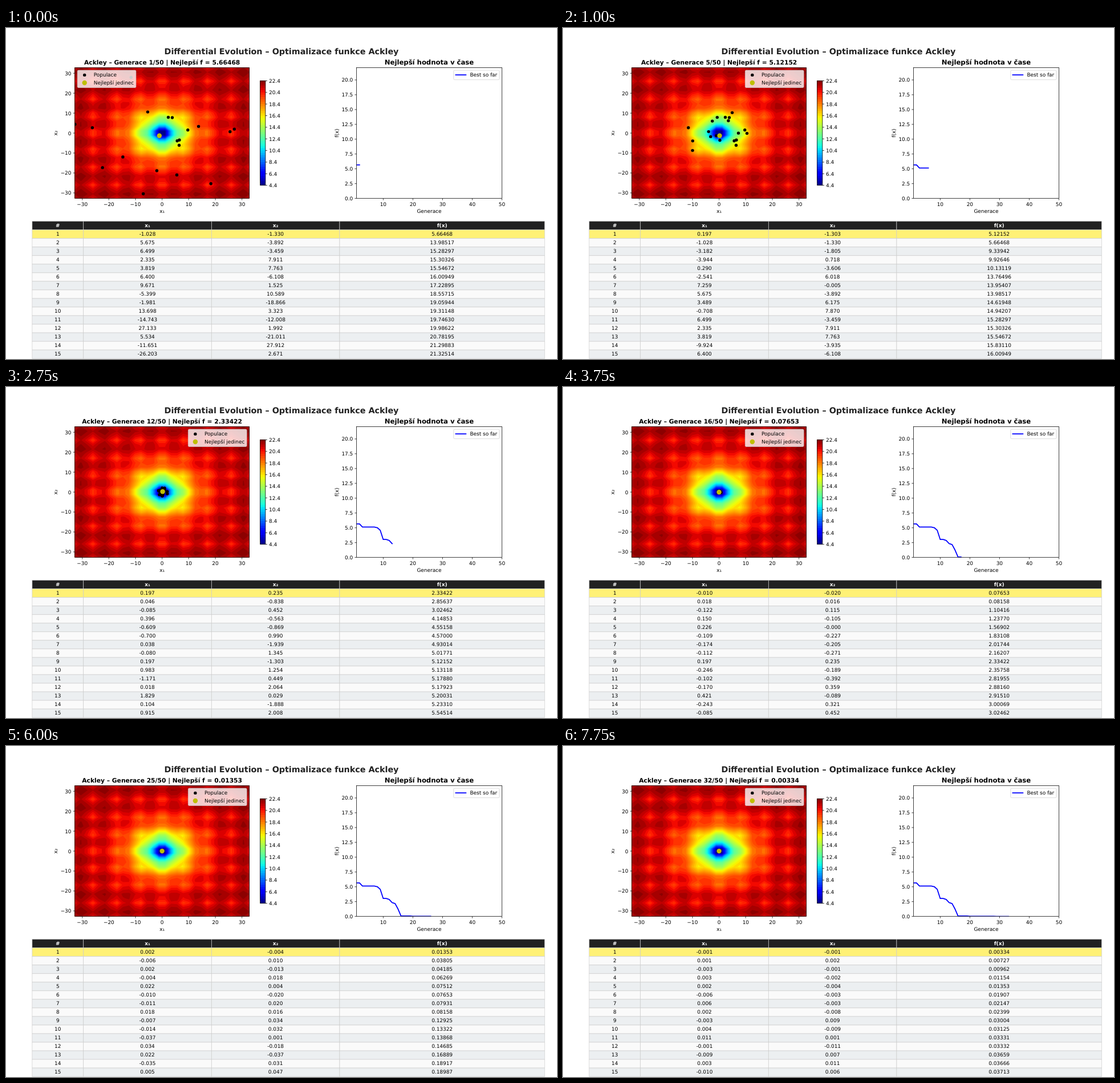
Recreate the animation shown at these times as an HTML page with a canvas. Size 966 by 580 pixels, loop 8000 ms.

```html
<!DOCTYPE html>
<html lang="cs">
<head>
<meta charset="utf-8">
<title>Differential Evolution</title>
<style>
  html, body { margin: 0; width: 966px; height: 580px; overflow: hidden; background: #fff; }
  canvas, svg { position: absolute; left: 0; top: 0; display: block; }
  text { font-family: "DejaVu Sans", sans-serif; font-size: 8.94px; text-rendering: geometricPrecision; }
  .mid { text-anchor: middle; }
  .end { text-anchor: end; }
  .bold { font-weight: bold; }
  .axis { fill: none; stroke: #000; stroke-width: .75; }
  .legend { fill: #fff; fill-opacity: .8; stroke: #ccc; stroke-opacity: .8; stroke-width: .89; }
  .curve { fill: none; stroke: #00f; stroke-width: 1.79; stroke-linecap: square; stroke-linejoin: round; }
  .best { fill: #bfbf00; }
</style>
</head>
<body>
<canvas id="map" width="966" height="580"></canvas>
<svg id="stage" width="966" height="580" viewBox="0 0 966 580"></svg>
<script>
const STEP = 250, GENS = 32, POP = 20, ROWS = 15, LIM = 32.768;
const EM = 8.94;
const left = { x: 120.75, y: 69.6, w: 305.83, h: 229.02 };
const right = { x: 614.54, y: 69.6, w: 254.86, h: 229.02 };
const bar = { x: 445.7, y: 92.5, w: 9.15, h: 183.2 };
const BOTTOM = left.y + left.h;
const px = x => left.x + left.w * (.5 + x / (2 * LIM));
const py = y => left.y + left.h * (.5 - y / (2 * LIM));
const gx = g => right.x + (g - 1) * right.w / 49;
const gy = f => BOTTOM - f * right.h / 22.06;

function ackley(x, y) {
  const c = v => Math.cos(2 * Math.PI * v);
  return 20 + Math.E - 20 * Math.exp(-.2 * Math.sqrt((x * x + y * y) / 2)) - Math.exp((c(x) + c(y)) / 2);
}

// --- population ---
// Each new best member: generation, x1, x2, f.
const bests = [
  [1, -1.028, -1.33, 5.66468], [2, .197, -1.303, 5.12152], [7, -.08, 1.345, 5.01771],
  [8, -.7, .99, 4.57], [9, -.085, .452, 3.02462], [11, .046, -.838, 2.85637],
  [12, .197, .235, 2.33422], [13, -.112, -.271, 2.16207], [14, .15, -.105, 1.2377],
  [15, -.01, -.02, .07653], [18, -.004, .018, .06269], [19, .002, -.004, .01353],
  [28, .001, .002, .00727], [30, -.001, -.001, .00334]
].map(([born, x, y, f]) => ({ born, x, y, f }));

let seed = 20;
const rand = () => (seed = (seed * 16807) % 2147483647) / 2147483647;
const spread = g => LIM * Math.exp((1 - g) / 4);
const inside = (m, g) => Math.max(Math.abs(m.x), Math.abs(m.y)) <= spread(g);

function offspring(g, floor) {
  const coord = () => { const u = 2 * rand() - 1; return spread(g) * u * Math.sqrt(Math.abs(u)); };
  let m;
  do {
    m = { x: coord(), y: coord() };
    m.f = ackley(m.x, m.y);
  } while (m.f <= floor);
  return m;
}

// The search box shrinks steadily; members left outside it are replaced.
const pops = [];
let crowd = Array(POP - 1).fill({ x: Infinity, y: Infinity });
for (let g = 1; g <= GENS; g++) {
  const elite = bests.filter(b => b.born <= g);
  const floor = elite[elite.length - 1].f;
  crowd = crowd.map(m => inside(m, g) && m.f > floor ? m : offspring(g, floor));
  pops[g] = elite.filter(b => inside(b, g)).concat(crowd).sort((a, b) => a.f - b.f).slice(0, POP);
}

// --- contour map ---
const clamp = v => Math.max(0, Math.min(1, v));
const jet = t => 'rgb(' + [
  Math.min((t - .35) / .31, 1 - (t - .89) / .22),
  Math.min((t - .125) / .25, (.91 - t) / .27),
  Math.min(.5 + t / .22, (.65 - t) / .31)
].map(v => Math.round(255 * clamp(v))).join() + ')';

function drawMap() {
  const ctx = document.getElementById('map').getContext('2d');
  const N = 30, BANDS = 45, at = i => -LIM + i * 2 * LIM / (N - 1);
  const grid = Array.from({ length: N }, (_, i) => Array.from({ length: N }, (_, j) =>
    ({ x: px(at(i)), y: py(at(j)), z: ackley(at(i), at(j)) })));
  for (let k = 0; k < BANDS; k++) {
    const level = 4.4 + .4 * k;
    ctx.fillStyle = jet((k + .5) / BANDS);
    ctx.beginPath();
    for (let i = 0; i < N - 1; i++) for (let j = 0; j < N - 1; j++) {
      const quad = [grid[i][j], grid[i + 1][j], grid[i + 1][j + 1], grid[i][j + 1]];
      const pts = [];
      quad.forEach((a, c) => {
        const b = quad[(c + 1) % 4];
        if (a.z >= level) pts.push([a.x, a.y]);
        if ((a.z >= level) !== (b.z >= level)) {
          const u = (level - a.z) / (b.z - a.z);
          pts.push([a.x + u * (b.x - a.x), a.y + u * (b.y - a.y)]);
        }
      });
      pts.forEach((p, c) => c ? ctx.lineTo(...p) : ctx.moveTo(...p));
      if (pts.length) ctx.closePath();
    }
    ctx.fill();
    ctx.fillRect(bar.x, bar.y, bar.w, bar.h * (1 - k / BANDS));
  }
}

// --- static chart parts ---
const stage = document.getElementById('stage');
function add(tag, attrs, parent = stage) {
  const el = document.createElementNS('http://www.w3.org/2000/svg', tag);
  for (const k in attrs) el.setAttribute(k, attrs[k]);
  parent.appendChild(el);
  return el;
}
function label(x, y, str, cls = 'mid', attrs = {}, parent = stage) {
  const el = add('text', { x, y, class: cls, ...attrs }, parent);
  el.textContent = str;
  return el;
}
const num = v => String(v).replace('-', '−');
const line = d => add('path', { d, class: 'axis' });
function xTick(x, v) {
  line(`M${x} ${BOTTOM}v3.13`);
  label(x, BOTTOM + 13.1, num(v));
}
function yTick(x, y, str) {
  line(`M${x} ${y}h-3.13`);
  label(x - 6.26, y + 3.4, str, 'end');
}
const rect = (b, attrs, parent) => add('rect', { x: b.x, y: b.y, width: b.w, height: b.h, ...attrs }, parent);
function clip(id, box) {
  rect(box, {}, add('clipPath', { id }));
  return add('g', { 'clip-path': `url(#${id})` });
}
const midX = b => b.x + b.w / 2;
const sideLabel = (x, str) =>
  label(0, 0, str, 'mid', { transform: `translate(${x} ${left.y + left.h / 2}) rotate(-90)` });

drawMap();
label(483, 45.7, 'Differential Evolution – Optimalizace funkce Ackley', 'mid bold',
  { style: 'font-size:14.31px', fill: '#222' });
const title = label(midX(left), 64.2, '', 'mid bold', { style: 'font-size:10.73px' });
label(midX(right), 64.2, 'Nejlepší hodnota v čase', 'mid bold', { style: 'font-size:11.63px' });

const dots = clip('left', left);
const curve = add('path', { class: 'curve' }, clip('right', right));
[left, right, bar].forEach(b => rect(b, { class: 'axis' }));

for (let v = -30; v <= 30; v += 10) {
  xTick(px(v), v);
  yTick(left.x, py(v), num(v));
}
for (let v = 10; v <= 50; v += 10) xTick(gx(v), v);
for (let v = 0; v <= 20; v += 2.5) yTick(right.x, gy(v), v.toFixed(1));
for (let i = 0; i < 10; i++) {
  const y = bar.y + bar.h * (1 - i / 9);
  line(`M${bar.x + bar.w} ${y}h3.13`);
  label(bar.x + bar.w + 6.26, y + 3.4, (4.4 + 2 * i).toFixed(1), '');
}
label(midX(left), 324.1, 'x₁');
label(midX(right), 324.1, 'Generace');
sideLabel(89.8, 'x₂');
sideLabel(582.9, 'f(x)');

const legend = add('g', {});
rect({ x: 125.2, y: 74.07, w: 102.7, h: 30.4 }, { rx: 1.8, class: 'legend' }, legend);
add('circle', { cx: 137.7, cy: 82.4, r: 2.7 }, legend);
add('circle', { cx: 137.7, cy: 96, r: 4.2, class: 'best' }, legend);
label(153.8, 85, 'Populace', '', {}, legend);
label(153.8, 98.7, 'Nejlepší jedinec', '', {}, legend);

rect({ x: 784.8, y: 74.07, w: 80.1, h: 16.6 }, { rx: 1.8, class: 'legend' });
add('path', { d: 'M788.4 82.2h17.9', class: 'curve' });
label(813.4, 85.2, 'Best so far', '');

// --- table ---
const TABLE = { x: 45.88, y: 338.73, w: 898.38 }, ROW_H = 15.027;
const cols = [0, .1, .35, .6, 1].map(u => TABLE.x + u * TABLE.w);
function tableRow(i, fill, texts, cls, color) {
  const y = TABLE.y + i * ROW_H;
  return texts.map((s, c) => {
    const cell = { x: cols[c], y, w: cols[c + 1] - cols[c], h: ROW_H };
    rect(cell, { fill, stroke: '#ccc', 'stroke-width': .7 });
    return label(midX(cell), y + 10.1, s, cls, { fill: color });
  });
}
tableRow(0, '#212121', ['#', 'x₁', 'x₂', 'f(x)'], 'mid bold', '#fff');
const cells = [];
for (let i = 1; i <= ROWS; i++)
  cells.push(tableRow(i, i === 1 ? '#fff176' : i % 2 ? '#eceff1' : '#fafafa', [i, '', '', ''], 'mid', '#000'));

// --- animation ---
function show(gen) {
  const pop = pops[gen];
  title.textContent = `Ackley – Generace ${gen}/50 | Nejlepší f = ${pop[0].f.toFixed(5)}`;
  dots.textContent = '';
  const dot = (m, r, cls) => add('circle', { cx: px(m.x), cy: py(m.y), r, class: cls }, dots);
  pop.forEach(m => dot(m, 2.7, ''));
  dot(pop[0], 4.2, 'best');
  legend.setAttribute('transform', `translate(${gen === 1 ? 0 : left.w - 102.7 - EM} 0)`);
  let d = `M${gx(1)} ${gy(pops[1][0].f)}`;
  for (let g = 1; g <= gen; g++) d += `L${gx(g + 1)} ${gy(pops[g][0].f)}`;
  curve.setAttribute('d', d);
  cells.forEach(([, x, y, f], i) => {
    x.textContent = pop[i].x.toFixed(3);
    y.textContent = pop[i].y.toFixed(3);
    f.textContent = pop[i].f.toFixed(5);
  });
}

let shown = 0;
function tick() {
  const gen = Math.floor(performance.now() / STEP) % GENS + 1;
  if (gen !== shown) show(shown = gen);
  requestAnimationFrame(tick);
}
tick();
</script>
</body>
</html>
```
